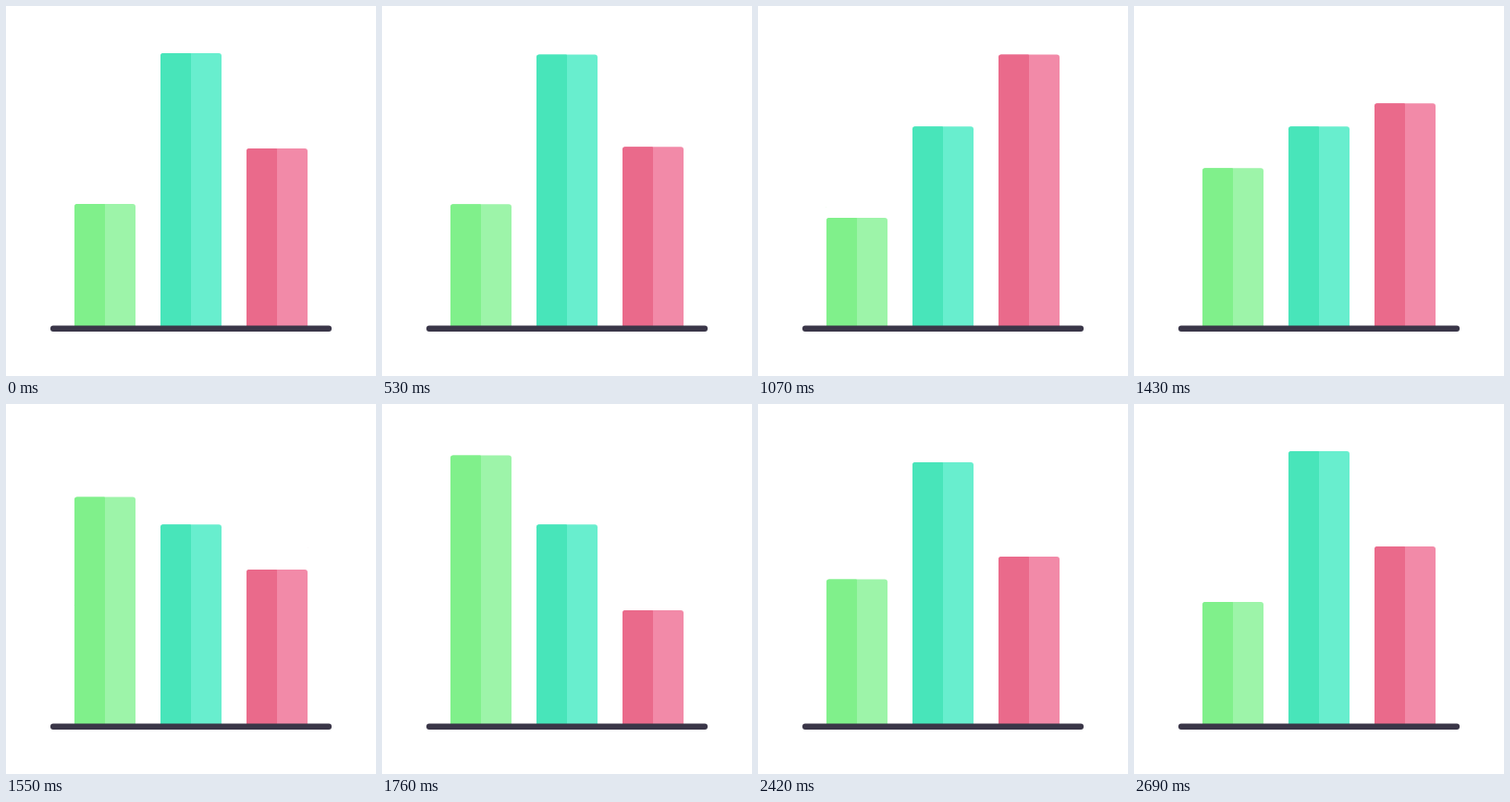
These frames come from a looping animation (400 by 400 pixels, 2930 ms). An HTML page:

```html
<!DOCTYPE html>
<html lang="en">
<head>
<meta charset="utf-8">
<title>Bar chart</title>
<style>
  html, body { margin: 0; width: 100%; height: 100%; overflow: hidden; background: #fff; }
  svg { display: block; width: 100%; height: 100%; }
</style>
</head>
<body>
<svg id="chart" viewBox="0 0 400 400" xmlns="http://www.w3.org/2000/svg"></svg>
<script>
const LOOP = 2930, TICK = 30, PHASE = 20, FIRST_MOVE = 530;
const DURATION = 600, STARTS = [488, 1283, 2084];
const WIDTH = 66, BASE = 346, RADIUS = 3;

// tops: bar height positions in the three poses
const BARS = [
  { x: 74, dark: '#80f08b', light: '#9df4a9', tops: [214, 229, 51] },
  { x: 167, dark: '#48e5ba', light: '#68eece', tops: [51, 130.3, 130.3] },
  { x: 260, dark: '#ea6a8b', light: '#f28aa8', tops: [154, 52.4, 227.6] }
];

const chart = document.getElementById('chart');

function add(tag, attrs) {
  const el = document.createElementNS(chart.namespaceURI, tag);
  for (const key in attrs) el.setAttribute(key, attrs[key]);
  return chart.appendChild(el);
}

for (const bar of BARS) {
  bar.lightEl = add('path', { fill: bar.light });
  bar.darkEl = add('path', { fill: bar.dark });
}
add('rect', { x: 48, y: 345.4, width: 304, height: 6.6, rx: 3, fill: '#3a3648' });

// cubic-bezier(.33, 0, .2, 1), solved by bisection
function ease(u) {
  if (u <= 0) return 0;
  if (u >= 1) return 1;
  let lo = 0, hi = 1;
  for (let i = 0; i < 24; i++) {
    const s = (lo + hi) / 2, q = 1 - s;
    const x = 0.99 * s * q * q + 0.6 * s * s * q + s * s * s;
    if (x < u) lo = s; else hi = s;
  }
  return lo * lo * (3 - 2 * lo);
}

function topAt(tops, t) {
  let y = tops[0];
  STARTS.forEach((start, i) => {
    y += (tops[(i + 1) % 3] - tops[i]) * ease((t - start) / DURATION);
  });
  return y;
}

function draw(time) {
  let t = time % LOOP;
  t = t < FIRST_MOVE ? 0 : Math.floor((t - PHASE) / TICK) * TICK + PHASE;
  for (const { x, tops, lightEl, darkEl } of BARS) {
    const y = topAt(tops, t), mid = x + WIDTH / 2, right = x + WIDTH;
    const left = `M${x} ${BASE}V${y + RADIUS}Q${x} ${y} ${x + RADIUS} ${y}`;
    lightEl.setAttribute('d',
      `${left}H${right - RADIUS}Q${right} ${y} ${right} ${y + RADIUS}V${BASE}Z`);
    darkEl.setAttribute('d', `${left}H${mid - 1}Q${mid} ${y} ${mid} ${y + 1}V${BASE}Z`);
  }
}

let origin = null;
function frame(now) {
  if (origin === null) origin = now;
  draw(Math.max(0, now - origin));
  requestAnimationFrame(frame);
}
draw(0);
requestAnimationFrame(frame);
</script>
</body>
</html>
```
